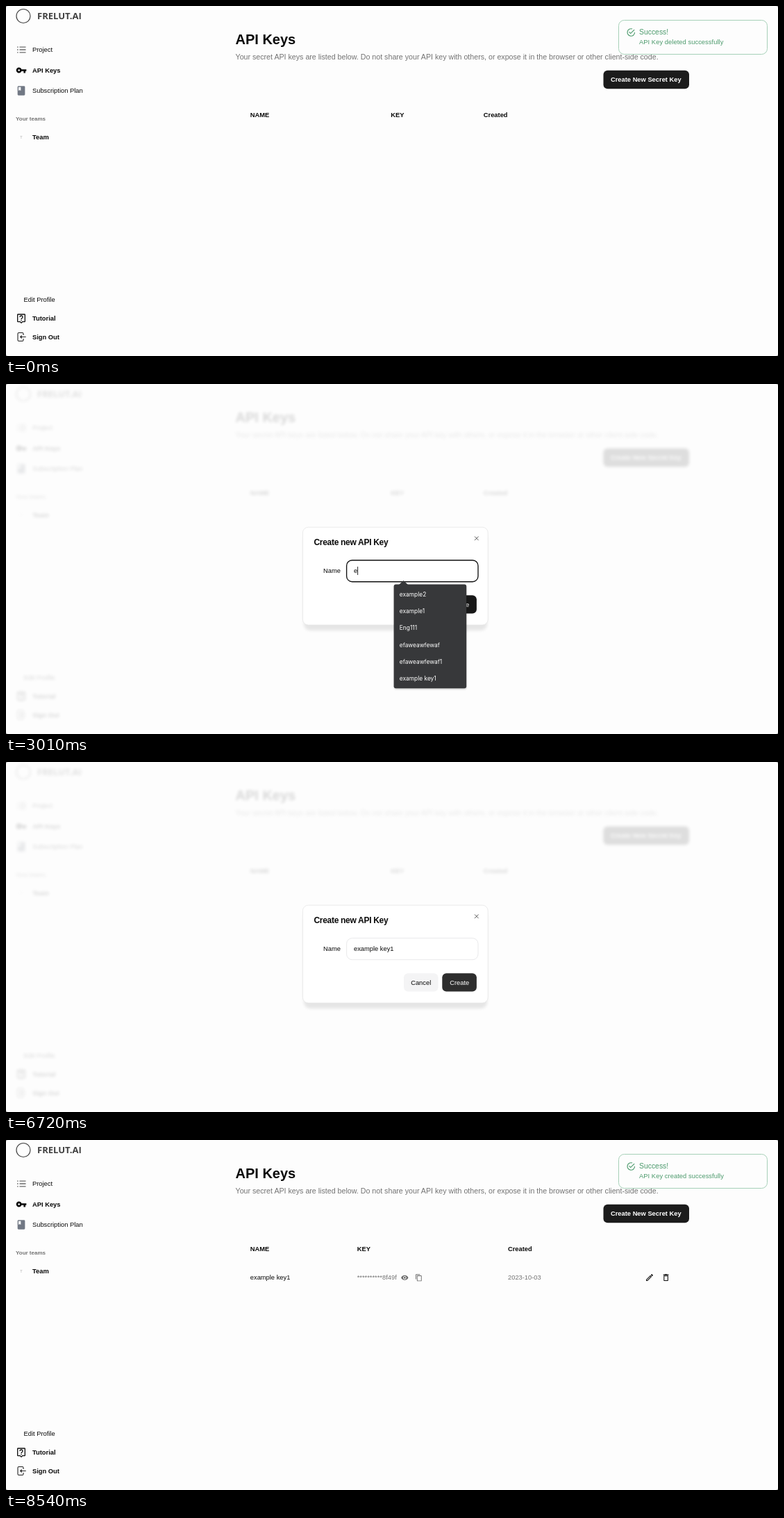
Write an HTML page that moves like this. It is 1112 px wide and 504 px high and loops after 8610 ms.

```html
<!DOCTYPE html>
<html lang="en">
<head>
<meta charset="utf-8">
<title>API Keys</title>
<style>
html, body { margin: 0; width: 100%; height: 100%; overflow: hidden; background: #fdfdfd; }
svg { display: block; width: 100vw; height: 100vh; }
text { font: 9.333px "Liberation Sans", Arial, sans-serif; white-space: pre; fill: #0a0a0a; }
.b { font-weight: 700; }
.g { fill: #737373; }
.w { fill: #fff; }
.ok { fill: #4c9a6c; }
.tip text { font: 8.4px Inter, sans-serif; fill: #fff; }
</style>
</head>
<body>
<svg viewBox="0 0 1112 504" xmlns="http://www.w3.org/2000/svg">
  <g id="page">
    <g id="side">
      <circle cx="25" cy="14.5" r="10" fill="none" stroke="#444" stroke-width="1.2"/>
      <text x="45" y="19.4" class="b" style="font-family:'Open Sans',sans-serif;font-size:13px;fill:#404040">FRELUT.AI</text>
      <path d="M19.5 59.2h9M19.5 63h9M19.5 66.8h9M16 59.2h1.6M16 63h1.6M16 66.8h1.6" stroke="#6b6b6b" stroke-width="1.3"/>
      <text x="38" y="66.3">Project</text>
      <text x="38" y="95.8" class="b">API Keys</text>
      <text x="38" y="125.3">Subscription Plan</text>
      <text x="14" y="164.9" class="b g" style="font-size:8px">Your teams</text>
      <g id="trim">
        <path d="M190.5 0V504" stroke="#ebebeb"/>
        <rect y="501" width="190" height="3" fill="#eceef0"/>
        <circle cx="22" cy="189" r="7" fill="#fcfcfc" stroke="#f0f0f0" stroke-width=".8"/>
        <rect x="14.3" y="409.5" width="67" height="26.5" rx="6" fill="none" stroke="#efefef" stroke-width=".8"/>
      </g>
      <text x="22" y="190.8" text-anchor="middle" style="font-size:5.5px;fill:#aaa">T</text>
      <text x="38" y="192.2" class="b">Team</text>
      <text x="25.5" y="426.2">Edit Profile</text>
      <text x="38" y="453.2" class="b">Tutorial</text>
      <path d="M25 474v-2q0-1.5-1.5-1.5h-5q-1.5 0-1.5 1.5v9q0 1.5 1.5 1.5h5q1.5 0 1.5-1.5v-2M28.7 476.5h-8M22.7 474.5l-2 2 2 2" fill="none" stroke="#222" stroke-width="1.1"/>
      <text x="38" y="480.1" class="b">Sign Out</text>
    </g>
    <g id="main">
      <text x="330.5" y="55" class="b" style="font-size:20px">API Keys</text>
      <text x="330.5" y="77.4" class="g" style="font-size:10.67px">Your secret API keys are listed below. Do not share your API key with others, or expose it in the browser or other client-side code.</text>
      <rect id="newKey" x="860.5" y="92.8" width="123.5" height="26.4" rx="6"/>
      <text x="871" y="109.3" class="b w">Create New Secret Key</text>
      <text x="351.8" y="160.2" class="b">NAME</text>
      <text id="hKey" y="160.2" class="b">KEY</text>
      <text id="hMade" y="160.2" class="b">Created</text>
      <g id="row">
        <text x="351.8" y="201.3">example key1</text>
        <text x="505.7" y="201.3" class="g">**********8f49f</text>
        <text x="723" y="201.3" class="g">2023-10-03</text>
      </g>
    </g>
    <g id="bones" fill="#e5e6e6"></g>
    <g id="toast">
      <rect x="882.5" y="20.5" width="214" height="49" rx="8" fill="none" stroke="#9ccbb0" stroke-width=".9"/>
      <text x="912" y="40.9" class="ok" style="font-size:10.4px">Success!</text>
      <text id="note" x="912" y="55" class="ok" letter-spacing=".06"></text>
    </g>
  </g>
  <g id="modal">
    <rect x="429" y="214" width="264" height="141" rx="9" fill="#000" opacity=".09" style="filter:blur(2px)"/>
    <rect x="427.4" y="206.2" width="266.8" height="140.8" rx="8" fill="#fff" stroke="#e6e6e6" stroke-width=".8"/>
    <text x="443.5" y="232" class="b" style="font-size:12px" letter-spacing="-.3">Create new API Key</text>
    <path d="M675 219.5l5.6 5.6m0-5.6l-5.6 5.6" stroke="#555" stroke-width=".95"/>
    <text x="457" y="272.4">Name</text>
    <rect id="field" x="490.6" y="253.7" width="189.4" height="31" rx="8" fill="#fff"/>
    <text id="entry" x="501" y="272.4"></text>
    <rect id="caret" y="263" width=".9" height="12" fill="#111"/>
    <rect x="573" y="304.3" width="49.5" height="26.2" rx="6" fill="#f4f4f5"/>
    <text x="583.2" y="320.9">Cancel</text>
    <rect id="create" x="628.3" y="304.3" width="49.6" height="26.2" rx="6"/>
    <text x="639.2" y="320.9" class="w">Create</text>
    <g id="tip" class="tip">
      <rect id="tipShade" x="559" y="290" width="104.5" rx="3" fill="#000" opacity=".18" style="filter:blur(1px)"/>
      <path d="M566 289l6.5-6 6.5 6z" fill="#37383a"/>
      <rect id="tipBox" x="558.6" y="288.5" width="104.6" rx="3" fill="#37383a"/>
      <g id="tipRows"></g>
    </g>
  </g>
  <path d="M0 0H1112V504H0ZM3 0Q0 0 0 3V501Q0 504 3 504H1109Q1112 504 1112 501V3Q1112 0 1109 0Z" fill="#999" fill-rule="evenodd"/>
</svg>
<script>
const LOOP = 8610, STEP = 70;
const OPEN = 1660, CLOSE = 7490, READY = 8120;
const NS = 'http://www.w3.org/2000/svg';
const $ = id => document.getElementById(id);

function add(parent, tag, attrs, text) {
  const el = document.createElementNS(NS, tag);
  for (const k in attrs) el.setAttribute(k, attrs[k]);
  if (text) el.textContent = text;
  parent.appendChild(el);
  return el;
}
const set = (id, k, v) => $(id).setAttribute(k, v);
const show = (id, on) => { $(id).style.display = on ? '' : 'none'; };
const ramp = (t, from, len) => Math.min(1, Math.max(0, (t - from) / len));
const smooth = p => p * p * (3 - 2 * p);
const gray = v => `rgb(${v},${v},${v})`;

// 24-unit glyphs, centred on x, y
function icon(parent, x, y, size, fill, d) {
  const s = size / 24;
  add($(parent), 'path', { d, fill, transform: `translate(${x - size / 2} ${y - size / 2}) scale(${s})` });
}
icon('side', 22, 92.5, 16, '#0a0a0a', 'M12.65 10C11.83 7.67 9.61 6 7 6c-3.31 0-6 2.69-6 6s2.69 6 6 6c2.61 0 4.83-1.67 5.65-4H17v4h4v-4h2v-4H12.65zM7 14c-1.1 0-2-.9-2-2s.9-2 2-2 2 .9 2 2-.9 2-2 2z');
icon('side', 22, 122, 16, '#717884', 'M18 2H6c-1.1 0-2 .9-2 2v16c0 1.1.9 2 2 2h12c1.1 0 2-.9 2-2V4c0-1.1-.9-2-2-2zM6 4h5v8l-2.5-1.5L6 12V4z');
icon('side', 22, 450, 16, '#111', 'M19 2H5c-1.11 0-2 .9-2 2v14c0 1.1.89 2 2 2h4l3 3 3-3h4c1.1 0 2-.9 2-2V4c0-1.1-.9-2-2-2zm0 16h-4.83L12 20.17 9.83 18H5V4h14v14zm-8-3h2v2h-2zm1-8c1.1 0 2 .9 2 2 0 2-3 1.75-3 5h2c0-2.25 3-2.5 3-5 0-2.21-1.79-4-4-4s-4 1.79-4 4h2c0-1.1.9-2 2-2z');
icon('row', 574.3, 198.3, 11.3, '#6b6b6b', 'M12 4.5C7 4.5 2.73 7.61 1 12c1.73 4.39 6 7.5 11 7.5s9.27-3.11 11-7.5c-1.73-4.39-6-7.5-11-7.5zM12 17c-2.76 0-5-2.24-5-5s2.24-5 5-5 5 2.24 5 5-2.24 5-5 5zm0-8c-1.66 0-3 1.34-3 3s1.34 3 3 3 3-1.34 3-3-1.34-3-3-3z');
icon('row', 594.6, 198.3, 11, '#6b6b6b', 'M16 1H4c-1.1 0-2 .9-2 2v14h2V3h12V1zm3 4H8c-1.1 0-2 .9-2 2v14c0 1.1.9 2 2 2h11c1.1 0 2-.9 2-2V7c0-1.1-.9-2-2-2zm0 16H8V7h11v14z');
icon('row', 927, 198, 13.3, '#111', 'M14.06 9.02l.92.92L5.92 19H5v-.92l9.06-9.06M17.66 3c-.25 0-.51.1-.7.29l-1.83 1.83 3.75 3.75 1.83-1.83c.39-.39.39-1.02 0-1.41l-2.34-2.34c-.2-.2-.45-.29-.71-.29zm-3.6 3.19L3 17.25V21h3.75L17.81 9.94l-3.75-3.75z');
icon('row', 950.6, 198, 13.3, '#111', 'M6 19c0 1.1.9 2 2 2h8c1.1 0 2-.9 2-2V7H6v12zM8 9h8v10H8V9zm7.5-5l-1-1h-5l-1 1H5v2h14V4h-3.5z');
icon('toast', 900.3, 38, 14, '#4c9a6c', 'M20 12a8 8 0 1 1-5.8-7.69l1.57-1.57A10 10 0 1 0 22 12zM7.91 10.08 6.5 11.5 11 16 21 6l-1.41-1.42L11 13.17z');

for (let i = 0; i < 9; i++) {
  const y = 40.2 + Math.floor(i / 3) * 53.7 + (i % 3) * 16;
  add($('bones'), 'rect', { x: 330.5, y, width: [522.8, 391.7, 653.5][i % 3], height: 9, rx: 2.8 });
}

const past = ['example2', 'example1', 'Eng111', 'efaweawfewaf', 'efaweawfewaf1', 'example key1', 'Example1', 'example3'];
const rows = Array.from({ length: 6 }, (_, i) => add($('tipRows'), 'text', { x: 566.8, y: 306.2 + i * 24.1 }));

const keys = [
  [0, ''], [2450, 'e'], [3220, 'ex'], [3360, 'exm'], [3500, 'exmp'], [3990, 'exm'], [4270, 'ex'],
  [4340, 'exa'], [4480, 'exam'], [4690, 'examp'], [5040, 'exampl'], [5180, 'example'], [5320, 'example '],
  [5460, 'example k'], [5530, 'example ke'], [5670, 'example key'], [6020, 'example key1']
];
const caretOff = [[2170, 2450], [2660, 3010], [4270, 4340], [6510, LOOP]];

function drawToast(t) {
  const leaving = t < READY;
  const p = leaving ? 1 - ramp(t, 20, 290) : ramp(t, READY - 40, 240);
  const grow = smooth(Math.min(1, p * 1.5));
  const sx = .75 + .25 * grow, sy = .5625 + .4375 * grow;
  show('toast', p > 0);
  set('toast', 'opacity', smooth(p));
  set('toast', 'transform', `translate(989.5 45) scale(${sx} ${sy}) translate(-989.5 -45)`);
  $('note').textContent = `API Key ${leaving ? 'deleted' : 'created'} successfully`;
}

function drawModal(t) {
  const on = t > OPEN && t < CLOSE;
  const p = on ? smooth(ramp(t, OPEN, 150)) : 0;
  $('page').style.filter = p ? `blur(${1.9 * p}px)` : '';
  $('page').style.opacity = 1 - .85 * p;
  show('modal', on);
  if (!on) return;
  set('modal', 'opacity', Math.min(1, .4 + .6 * p));
  set('modal', 'transform', `translate(560.8 276.6) scale(${.9 + .1 * p}) translate(-560.8 -276.6)`);

  const value = keys.filter(k => k[0] <= t).pop()[1];
  $('entry').textContent = value;
  set('caret', 'x', 501 + (value ? $('entry').getComputedTextLength() : 0));
  show('caret', !caretOff.some(([a, b]) => t >= a && t < b));

  const focus = t < 6720;
  set('field', 'stroke', focus ? '#111' : '#e2e2e5');
  set('field', 'stroke-width', focus ? 1.35 : .8);
  set('create', 'fill', gray(Math.round(24 + 22 * ramp(t, 6440, 210))));

  const hits = value ? past.filter(s => s !== value && s.toLowerCase().startsWith(value)).slice(0, 6) : [];
  show('tip', hits.length);
  rows.forEach((r, i) => { r.textContent = hits[i] || ''; });
  const h = 5.2 + 24.1 * hits.length;
  set('tipBox', 'height', h);
  set('tipShade', 'height', h);
}

function render(t) {
  const loading = t >= CLOSE && t < READY, done = t >= READY;
  show('main', !loading);
  show('bones', loading);
  show('trim', loading);
  show('row', done);
  set('bones', 'opacity', .75 + .25 * Math.cos((t - CLOSE) / 1000 * Math.PI));
  set('hKey', 'x', done ? 505.7 : 554.3);
  set('hMade', 'x', done ? 723 : 687.8);
  set('newKey', 'fill', gray(Math.round(28 + (done ? 0 : 19 * ramp(t, 560, 250)))));
  drawToast(t);
  drawModal(t);
}

const start = performance.now();
function tick() {
  const t = (performance.now() - start) % LOOP;
  render(Math.floor(t / STEP) * STEP);
  requestAnimationFrame(tick);
}
tick();
</script>
</body>
</html>
```
